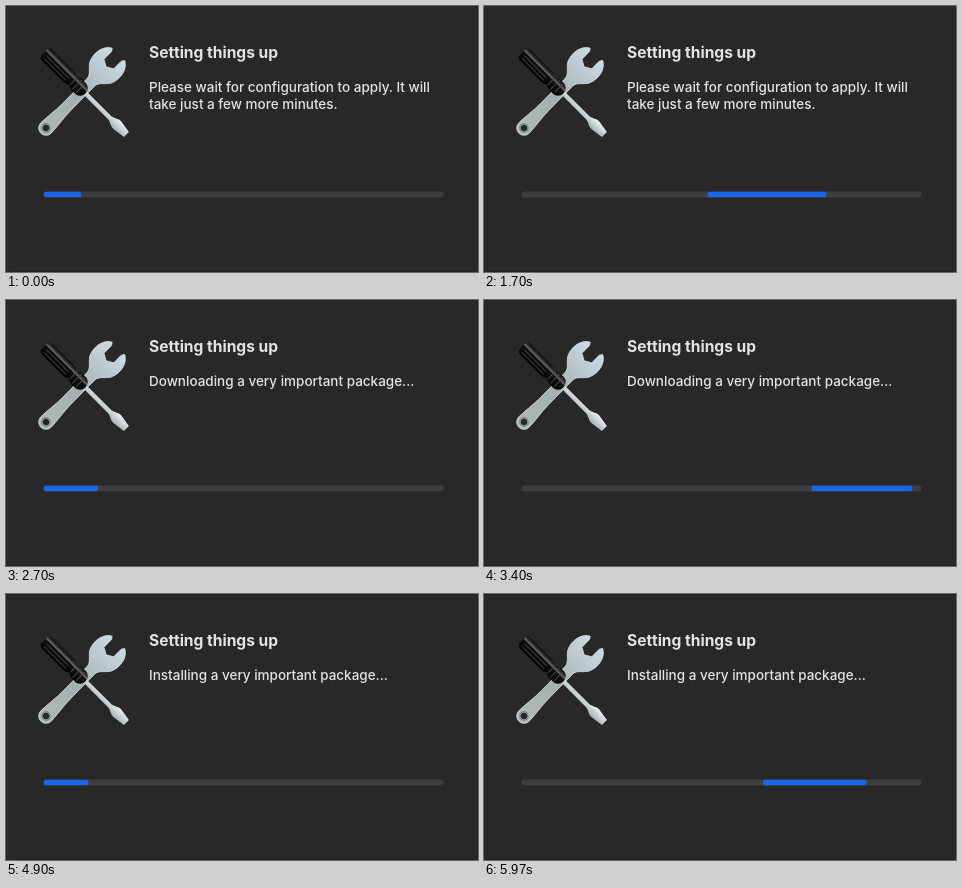
Animation, 472 px wide and 266 px high, one loop 6.13 s. Source, as an HTML page:

```html
<!DOCTYPE html>
<html lang="en">
<head>
<meta charset="utf-8">
<title>Setting things up</title>
<style>
  html, body { margin: 0; width: 100%; height: 100%; overflow: hidden; background: #282828; }
  svg { display: block; width: 100vw; height: 100vh; }
  text { font-family: Inter, Roboto, sans-serif; fill: #e3e3e3; }
  .title { font-size: 15.55px; font-weight: 700; }
  .body { font-size: 13.5px; font-weight: 500; }
</style>
</head>
<body>
<svg viewBox="0 0 472 266">
  <defs>
    <linearGradient id="steel">
      <stop offset="0" stop-color="#b0bab8"/>
      <stop offset=".45" stop-color="#a4b0b0"/>
      <stop offset=".75" stop-color="#b8c7cd"/>
      <stop offset="1" stop-color="#cddce3"/>
    </linearGradient>
    <linearGradient id="grip" x1="0" y1="0" x2="0" y2="1">
      <stop offset="0" stop-color="#0c0c0c"/>
      <stop offset=".18" stop-color="#2c2c2c"/>
      <stop offset=".3" stop-color="#6c6c6c"/>
      <stop offset=".4" stop-color="#121212"/>
      <stop offset="1" stop-color="#030303"/>
    </linearGradient>
    <linearGradient id="blade" x1="0" y1="0" x2="0" y2="1">
      <stop offset="0" stop-color="#eef2f3"/>
      <stop offset="1" stop-color="#a4b0b4"/>
    </linearGradient>
    <clipPath id="lane"><rect width="400" height="6" rx="3"/></clipPath>
  </defs>

  <!-- wrench -->
  <g transform="translate(40 122) rotate(-45.5) scale(.975)">
    <path fill="url(#steel)" stroke="#d3dde0" stroke-width=".8" fill-rule="evenodd"
      d="M0-7.5C8-7.5 20-5.5 30-5.5H66C72-6 74-12 80-15.5C90-20 102-17 106-9L103-7H92L88 0L92 7H103L106 9
         C102 17 90 20 80 15.5C74 12 72 6 66 5.5H30C20 5.5 8 7.5 0 7.5A7.5 7.5 0 0 1 0-7.5Z
         M-4 0A4 4 0 0 0 4 0A4 4 0 0 0-4 0Z"/>
    <circle r="4.3" fill="none" stroke="#657278" stroke-width="1"/>
  </g>

  <!-- screwdriver -->
  <g transform="translate(40.5 48.5) rotate(45)">
    <path fill="url(#blade)" d="M52-2.2H90C94-3 96-5.5 100-5.5L113-3.5V3.5L100 5.5C96 5.5 94 3 90 2.2H52Z"/>
    <path fill="url(#grip)"
      d="M-3-5Q-2-7.5 1-7.5H31Q35-7.5 37-5Q39-7.5 43-7.5H49Q55-6 55 0Q55 6 49 7.5H43Q39 7.5 37 5Q35 7.5 31 7.5H1Q-2 7.5-3 5Z"/>
    <path d="M1 1H32M1 4.6H32" stroke="#3a3a3a" stroke-width="1"/>
    <path d="M38-4.5V4.5M43-6.5V6.5M48-6V6" stroke="#484848" stroke-width="1"/>
  </g>

  <text class="title" x="143" y="52">Setting things up</text>
  <text class="body" x="143" y="86" id="line1"></text>
  <text class="body" x="143" y="103" id="line2"></text>

  <g transform="translate(37.5 185.5)">
    <rect width="400" height="6" rx="3" fill="#3e3e3e"/>
    <g clip-path="url(#lane)"><rect id="bar" height="6" rx="3" fill="#1966e6"/></g>
  </g>
  <path d="M4 265.5H468" stroke="#202020"/>
</svg>
<script>
  const LOOP = 6130, LAST_STEP = 5970, SWEEP = 4000 / 3, LEAD = 60, LENGTH = 400;
  const MESSAGES = [
    [0, "Please wait for configuration to apply. It will", "take just a few more minutes."],
    [2100, "Downloading a very important package...", ""],
    [4100, "Installing a very important package...", ""]
  ];
  // [ms into the sweep, distance along the track] for each end of the bar
  const HEAD = [[-50, 0], [0, 38], [34, 55], [367, 214], [467, 264], [600, 328], [700, 375], [752, 400]];
  const TAIL = [[205, 0], [367, 95], [467, 152], [600, 223], [700, 273], [734, 290], [900, 355], [1000, 386], [1085, 400]];

  const $ = id => document.getElementById(id);
  const bar = $("bar"), line1 = $("line1"), line2 = $("line2");

  function along(points, t) {
    if (t <= points[0][0]) return points[0][1];
    for (let i = 1; i < points.length; i++) {
      const [t0, x0] = points[i - 1], [t1, x1] = points[i];
      if (t < t1) return x0 + (x1 - x0) * (t - t0) / (t1 - t0);
    }
    return points[points.length - 1][1];
  }

  function render(t) {
    const step = t >= LAST_STEP ? LAST_STEP : Math.min(Math.floor(t / 100), 58) * 100;
    const sweep = Math.floor((step + LEAD) / SWEEP);
    const phase = step - sweep * SWEEP;
    const head = along(HEAD, phase), tail = along(TAIL, phase);
    bar.setAttribute("x", sweep % 2 ? LENGTH - head : tail);
    bar.setAttribute("width", Math.max(0, head - tail));

    const message = MESSAGES.filter(m => m[0] <= step).pop();
    line1.textContent = message[1];
    line2.textContent = message[2];
  }

  const start = performance.now();
  function tick() {
    render((performance.now() - start) % LOOP);
    requestAnimationFrame(tick);
  }
  tick();
</script>
</body>
</html>
```
